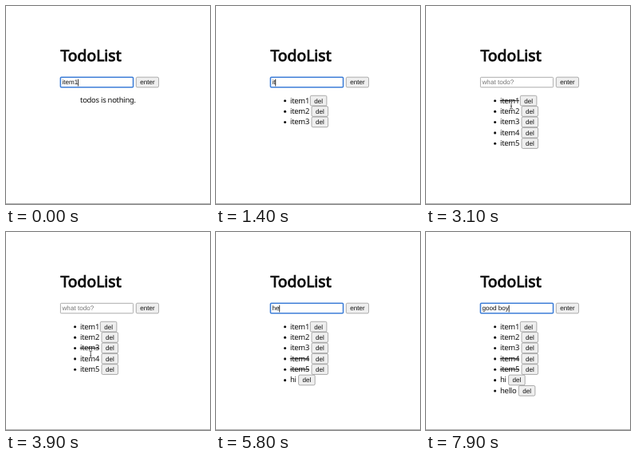
Write an HTML page that moves like this. It is 256 px wide and 248 px high and loops after 8000 ms.

```html
<!DOCTYPE html>
<html lang="en">
<head>
<meta charset="utf-8">
<title>TodoList</title>
<style>
html, body { margin: 0; width: 100%; height: 100%; overflow: hidden; background: #fff; }
svg { display: block; width: 256px; height: 248px; }
text { white-space: pre; fill: #111; text-rendering: geometricPrecision; }
.title { font: 19.4px "Noto Sans", sans-serif; fill: #0a0a0a; stroke: #0a0a0a; stroke-width: .85; }
.body { font: 9.5px "Noto Sans", sans-serif; letter-spacing: -.3px; }
.ui { font: 8.15px "Liberation Sans", Arial, sans-serif; }
.btn { fill: #efefef; stroke: #8a8a8a; stroke-width: .7; }
.mid { text-anchor: middle; }
</style>
</head>
<body>
<svg id="stage" viewBox="0 0 256 248"></svg>
<script>
const LOOP = 8000, STEP = 100;
const stage = document.getElementById('stage');

// What the input holds from each time on
const typed = [
  [0, 'item1'], [100, ''],
  [300, 'it'], [400, 'item'], [500, 'item2'], [600, ''],
  [700, 'i'], [800, 'it'], [1000, 'item'], [1100, 'item3'], [1200, ''],
  [1300, 'i'], [1400, 'it'], [1600, 'item'], [1700, 'item4'], [1800, ''],
  [2000, 'i'], [2100, 'it'], [2200, 'item'], [2300, 'item5'], [2400, ''],
  [5300, 'h'], [5400, 'hi'], [5500, ''],
  [5700, 'h'], [5800, 'he'], [5900, 'hel'], [6000, 'hell'], [6200, 'hello'], [6300, ''],
  [6500, 'g'], [6600, 'go'], [6700, 'goo'], [6800, 'goob'],
  [7000, 'goo'], [7100, 'good'], [7200, 'goodbo'], [7300, 'goodboy'],
  [7500, 'goodb'], [7600, 'goo'], [7700, 'good'], [7800, 'good b'], [7900, 'good boy']
];

// Added at, button x, times of clicks on the label
const items = [
  { name: 'item1', at: 100, bx: 118.3, clicks: [3000, 3300] },
  { name: 'item2', at: 600, bx: 120, clicks: [3500, 3600] },
  { name: 'item3', at: 1200, bx: 120, clicks: [3800, 4700] },
  { name: 'item4', at: 1800, bx: 120, clicks: [4000] },
  { name: 'item5', at: 2400, bx: 120, clicks: [4100] },
  { name: 'hi', at: 5500, bx: 103.6, clicks: [] },
  { name: 'hello', at: 6300, bx: 116.3, clicks: [] }
];

// Pointer way points: time, x, y
const path = [
  [2600, 227.5, 229], [2800, 160, 168], [3000, 107, 125], [3100, 107, 124],
  [3300, 107, 123.4], [3400, 107, 128.8], [3500, 107, 132.5], [3600, 106.6, 134],
  [3800, 106.4, 147], [4000, 106.2, 160], [4100, 106, 172], [4200, 106, 166],
  [4300, 106, 151], [4600, 106.5, 151.6], [4700, 107, 150.5],
  [4800, 133, 106], [4900, 154, 66], [5000, 117, 96.6]
];
const BLUR = 3000, FOCUS = 5000, HIDE = 5200;

function set(node, attrs) {
  for (const key in attrs) node.setAttribute(key, attrs[key]);
}
function el(tag, attrs, parent = stage, content = '') {
  const node = document.createElementNS('http://www.w3.org/2000/svg', tag);
  set(node, attrs);
  node.textContent = content;
  parent.appendChild(node);
  return node;
}
function show(node, on) {
  node.setAttribute('visibility', on ? 'visible' : 'hidden');
}
function button(x, y, w, label, parent) {
  el('rect', { x, y: y - 6.35, width: w, height: 12.7, rx: 1.6, class: 'btn' }, parent);
  el('text', { x: x + w / 2, y: y + 2.9, class: 'ui mid' }, parent, label);
}

el('rect', { width: 256, height: 248, fill: '#fff' });
el('rect', { y: 247, width: 256, height: 1, fill: '#b0b0b0' });
el('text', { x: 68.4, y: 68.8, class: 'title' }, stage, 'TodoList');

const LEFT = 70.5;
const box = el('rect', { x: 68.4, y: 89.3, width: 91.2, height: 12.5, rx: 1, fill: '#fff' });
const field = el('text', { x: LEFT, y: 98.4, class: 'ui' });
const caret = el('rect', { y: 91.6, width: .8, height: 8.8, fill: '#000' });
button(163.3, 95.5, 28.3, 'enter', stage);

const empty = el('text', { x: 93, y: 121, class: 'body' }, stage, 'todos is nothing.');

items.forEach((item, i) => {
  const y = 118.6 + 13.37 * i;
  item.row = el('g', {});
  el('circle', { cx: 86.6, cy: y + .2, r: 1.55, fill: '#111' }, item.row);
  const label = el('text', { x: 93, y: y + 2.9, class: 'body' }, item.row, item.name);
  item.line = el('rect', {
    x: 92.8, y: y - .4, height: .9, fill: '#111', width: label.getComputedTextLength()
  }, item.row);
  button(item.bx, y, 20.6, 'del', item.row);
});

const beamShape = 'M-1.9 -4.6Q0 -4.6 0 -3.6Q0 -4.6 1.9 -4.6M0 -3.6V3.6M-1.9 4.6Q0 4.6 0 3.6Q0 4.6 1.9 4.6M-1 1.4H1';
const beam = el('g', { fill: 'none' });
el('path', { d: beamShape, stroke: '#fff', 'stroke-width': 1.8, opacity: .7 }, beam);
el('path', { d: beamShape, stroke: '#333', 'stroke-width': .8 }, beam);
const arrow = el('path', {
  d: 'M0 0V8.4L1.9 6.7L3.2 9.6L4.6 9L3.4 6.2H6Z', fill: '#000', stroke: '#fff', 'stroke-width': .6
});

function pointerAt(t) {
  const next = path.findIndex(p => p[0] > t);
  if (next < 0) return path[path.length - 1].slice(1);
  const [t0, x0, y0] = path[next - 1], [t1, x1, y1] = path[next];
  const k = (t - t0) / (t1 - t0);
  return [x0 + (x1 - x0) * k, y0 + (y1 - y0) * k];
}

function drawPointer(t) {
  const on = t >= path[0][0] && t < HIDE;
  if (!on) {
    show(beam, false);
    show(arrow, false);
    return;
  }
  const [x, y] = pointerAt(t);
  const overText = x > 92 && x < 118 && y > 90 && y < 180;
  show(beam, overText);
  show(arrow, !overText);
  set(overText ? beam : arrow, { transform: `translate(${x} ${y})` });
}

function draw(t) {
  const focused = t < BLUR || t >= FOCUS;
  const value = typed.filter(k => k[0] <= t).pop()[1];
  set(box, { stroke: focused ? '#3f7fd8' : '#8a8a8a', 'stroke-width': focused ? 1.6 : .7 });
  field.textContent = value || 'what todo?';
  field.style.fill = value ? '#111' : '#757575';
  set(caret, { x: LEFT - .2 + (value ? field.getComputedTextLength() : 0) });
  show(caret, focused);
  show(empty, t < items[0].at);
  for (const item of items) {
    const done = item.clicks.filter(c => c <= t).length % 2;
    item.row.setAttribute('display', t >= item.at ? 'inline' : 'none');
    item.line.setAttribute('display', done ? 'inline' : 'none');
  }
  drawPointer(t);
}

const start = performance.now();
function tick() {
  const t = (performance.now() - start) % LOOP;
  draw(Math.floor(t / STEP) * STEP);
  requestAnimationFrame(tick);
}
tick();
</script>
</body>
</html>
```
